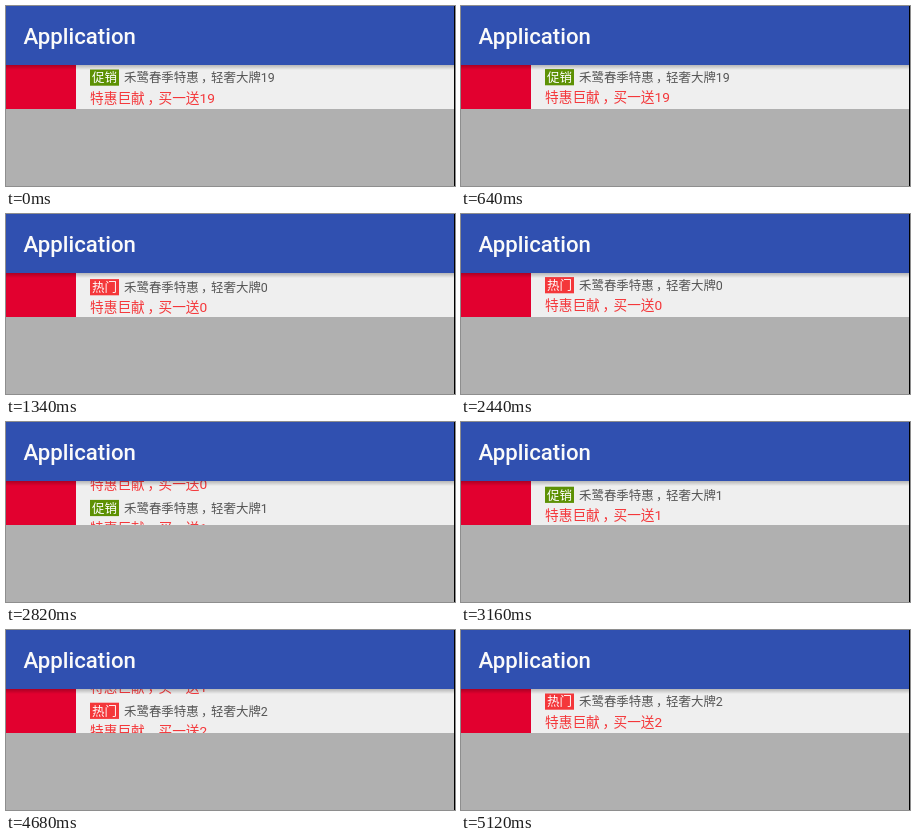
Animation, 449 px wide and 180 px high, one loop 5.3 s. Source, as an HTML page with a canvas:

```html
<!DOCTYPE html>
<html lang="zh-CN">
<head>
<meta charset="utf-8">
<title>Application</title>
<style>
  html, body { margin: 0; width: 100%; height: 100%; overflow: hidden; background: #b0b0b0; }
  canvas { display: block; width: 449px; height: 180px; }
</style>
</head>
<body>
<canvas id="stage"></canvas>
<script>
const W = 449, H = 180, LOOP = 5300;
const ROW = { top: 59, height: 44 };
const FONT = 'Roboto, "Noto Sans CJK SC", "Noto Sans CJK", sans-serif';
const RED = '#f4373a', GREEN = '#5d9104';

// A new item scrolls in every PERIOD; the picture refreshes every TICK
// and scrolls in whole steps of a dense screen's pixel.
const FIRST = 570, PERIOD = 1800, SCROLL_MS = 1000, TICK = 40, PIXEL = 0.4;
const ITEM_COUNT = 20;

const canvas = document.getElementById('stage');
const ctx = canvas.getContext('2d');
const dpr = window.devicePixelRatio || 1;
canvas.width = W * dpr;
canvas.height = H * dpr;
ctx.scale(dpr, dpr);

function rect(x, y, w, h, color) {
  ctx.fillStyle = color;
  ctx.fillRect(x, y, w, h);
}

function text(str, x, y, size, color, weight = 400) {
  ctx.font = `${weight} ${size}px ${FONT}`;
  ctx.fillStyle = color;
  ctx.fillText(str, x, y);
  return ctx.measureText(str).width;
}

// Two clauses joined by a comma set near the middle of its cell.
function phrase(before, after, x, y, size, color) {
  x += text(before, x, y, size, color);
  text('，', x + size * 0.2, y, size, color);
  text(after, x + size, y, size, color);
}

// Material standard curve: cubic-bezier(.4, 0, .2, 1)
function ease(p) {
  if (p <= 0) return 0;
  if (p >= 1) return 1;
  let lo = 0, hi = 1;
  for (let i = 0; i < 24; i++) {
    const u = (lo + hi) / 2, v = 1 - u;
    if (1.2 * u * v * v + 0.6 * u * u * v + u * u * u < p) lo = u; else hi = u;
  }
  return lo * lo * (3 - 2 * lo);
}

function drawItem(n, y) {
  const promo = n % 2 === 1;
  rect(84, y + 4.5, 29, 16.2, promo ? GREEN : RED);
  text(promo ? '促销' : '热门', 86, y + 17.3, 12.5, '#fff');
  phrase('禾鹭春季特惠', '轻奢大牌' + n, 118, y + 17.3, 12.45, '#555');
  phrase('特惠巨献', '买一送' + n, 84, y + 37.5, 13.7, RED);
}

function drawTicker(t) {
  const turn = Math.max(0, Math.floor((t - FIRST) / PERIOD));
  const progress = ease((t - FIRST - turn * PERIOD) / SCROLL_MS);
  const shift = Math.round(ROW.height * progress / PIXEL) * PIXEL;
  ctx.save();
  ctx.beginPath();
  ctx.rect(70, ROW.top, W - 70, ROW.height);
  ctx.clip();
  drawItem((turn + ITEM_COUNT - 1) % ITEM_COUNT, ROW.top - shift);
  drawItem(turn, ROW.top + ROW.height - shift);
  ctx.restore();
}

function draw(t) {
  rect(0, 0, W, H, '#b0b0b0');
  rect(0, ROW.top, W, ROW.height, '#efefef');
  rect(0, ROW.top, 70, ROW.height, '#e2002f');
  drawTicker(t);

  const shadow = ctx.createLinearGradient(0, 59, 0, 64);
  shadow.addColorStop(0, 'rgba(0,0,0,.24)');
  shadow.addColorStop(1, 'rgba(0,0,0,0)');
  rect(0, 59, W, 5, shadow);
  rect(0, 0, W, 59, '#3050b0');
  text('Application', 17.6, 37.6, 22.2, '#fafafa', 500);
  rect(W - 1, 0, 1, H, '#000');
}

function frame() {
  const t = performance.now() % LOOP;
  draw(t - t % TICK);
  requestAnimationFrame(frame);
}
frame();
</script>
</body>
</html>
```
